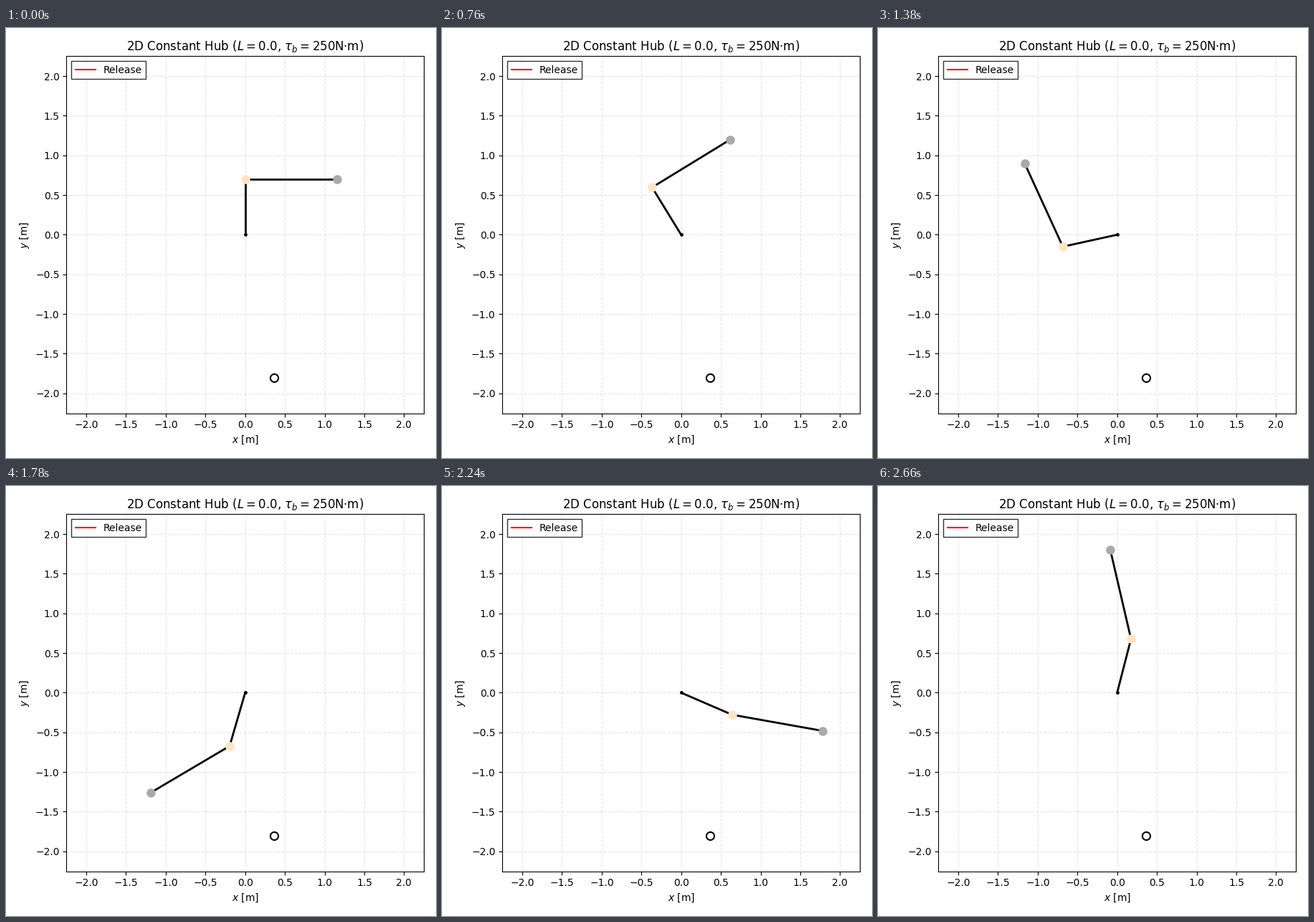
These frames come from a looping animation (600x600 px, 2680 ms). A matplotlib script:

```python
import numpy as np
import matplotlib.pyplot as plt
from matplotlib.animation import FuncAnimation

FRAMES, INTERVAL = 134, 20
ARM, CLUB = 0.7, 1.156      # lengths in m
BALL = (0.366, -1.805)
ACCEL = 0.04363             # deg per frame^2 while the wrist is locked
RELEASE = 40                # frame at which the wrist opens

# After release: frame, arm angle and rate, club angle and rate (degrees)
SWING = np.array([
    [40, 34.9, 1.745, 34.9, 1.745],
    [54, 63.5, 2.33, 64.6, 2.60],
    [69, 102.4, 2.81, 114.6, 4.10],
    [81, 138.1, 3.12, 169.0, 5.00],
    [89, 163.8, 3.27, 210.6, 5.55],
    [101, 204.6, 3.57, 281.7, 6.20],
    [108, 230.7, 3.87, 325.3, 6.20],
    [122, 290.4, 4.66, 408.6, 5.60],
    [133, 345.6, 5.33, 463.05, 4.30],
])


def hermite(t, t0, t1, p0, v0, p1, v1):
    h = t1 - t0
    s = (t - t0) / h
    return ((1 + 2 * s) * (1 - s) ** 2 * p0 + s * (1 - s) ** 2 * h * v0
            + s * s * (3 - 2 * s) * p1 + s * s * (s - 1) * h * v1)


def angles(t):
    """Arm turn from vertical and club turn from horizontal, in degrees."""
    if t <= RELEASE:
        turn = ACCEL * t * t / 2
        return turn, turn
    i = min(np.searchsorted(SWING[:, 0], t, side="right") - 1, len(SWING) - 2)
    a, b = SWING[i], SWING[i + 1]
    return tuple(hermite(t, a[0], b[0], a[k], a[k + 1], b[k], b[k + 1])
                 for k in (1, 3))


def polar(radius, degrees):
    rad = np.radians(degrees)
    return radius * np.array([np.cos(rad), np.sin(rad)])


plt.rcParams["font.family"] = "DejaVu Sans"
fig = plt.figure(figsize=(6, 6), dpi=100)
ax = fig.add_axes([84.3 / 600, 62.5 / 600, 498.8 / 600, 498.1 / 600])
ax.set(xlim=(-2.25, 2.25), ylim=(-2.25, 2.25))
ticks = np.arange(-2, 2.1, 0.5)
ax.set_xticks(ticks)
ax.set_yticks(ticks)
ax.grid(True, linestyle="--", alpha=0.3)
ax.set_xlabel("$x$ [m]")
ax.set_ylabel("$y$ [m]")
ax.set_title(r"2D Constant Hub ($L=0.0$, $\tau_b=250$N·m)")

ax.plot([], [], "r-", label="Release")
ax.plot(*BALL, "o", ms=8, mfc="white", mec="black", mew=1.5)
rods, = ax.plot([], [], "k-", lw=2)
ax.plot(0, 0, "k.", ms=5)
wrist, = ax.plot([], [], "o", ms=8, color="bisque")
head, = ax.plot([], [], "o", ms=8, color="darkgray")
ax.legend(loc="upper left", fancybox=False, edgecolor="black")


def update(frame):
    arm, club = angles(frame)
    joint = polar(ARM, 90 + arm)
    tip = joint + polar(CLUB, club)
    rods.set_data([0, joint[0], tip[0]], [0, joint[1], tip[1]])
    wrist.set_data([joint[0]], [joint[1]])
    head.set_data([tip[0]], [tip[1]])
    return rods, wrist, head


anim = FuncAnimation(fig, update, frames=FRAMES, interval=INTERVAL,
                     repeat=True, repeat_delay=0)
plt.show()
```
